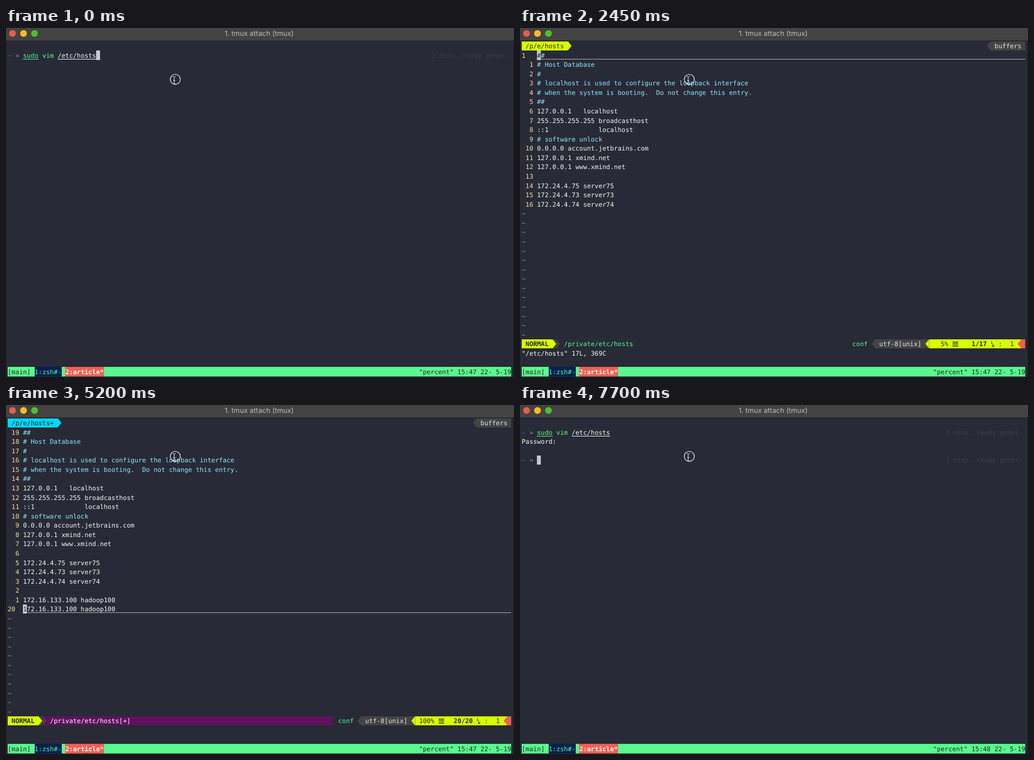
An HTML page that plays this animation: 902x621 px, repeating every 8 s.

```html
<!DOCTYPE html>
<html lang="en">
<head>
<meta charset="utf-8">
<title>Terminal</title>
<style>
  html, body { margin: 0; width: 100%; height: 100%; overflow: hidden; background: #282a36; }
  svg { display: block; }
  text {
    font: 11.345px "DejaVu Sans Mono", monospace;
    white-space: pre;
    text-rendering: geometricPrecision;
  }
  .bold { font-weight: bold; }
  .title { font: 12.4px Inter, "Open Sans", sans-serif; }
  .tiny { font-size: 6.5px; font-weight: bold; }
  rect { shape-rendering: crispEdges; }
</style>
</head>
<body>
<svg id="stage" width="902" height="621" viewBox="0 0 902 621"></svg>
<script>
const LOOP = 8000;
const CELL = 6.826, LINE = 16.57;
const C = {
  bg: '#282a36', fg: '#f8f8f2', green: '#5af78e', cyan: '#8be9fd', number: '#f1e0a0',
  cursor: '#c7c8cc', rule: '#b0b1b6', grey: '#444444', yellow: '#d7ff00', sky: '#00d7ff',
  blue: '#0057c2', navy: '#06204f', purple: '#5f115f', red: '#ee6055', dark: '#25281e',
  tilde: '#8790a8', faint: '#3b3d46'
};

const px = col => 3 + col * CELL;
const py = row => 23.5 + row * LINE;

// Drawing helpers, all placed on the character grid
const text = (row, col, str, fill = C.fg, cls = '') =>
  `<text x="${px(col)}" y="${py(row) + 12.5}" fill="${fill}" class="${cls}">${str}</text>`;

const block = (row, from, to, fill) =>
  `<rect x="${px(from)}" y="${py(row)}" width="${(to - from) * CELL}" height="${LINE}" fill="${fill}"/>`;

const rule = (row, from, to, fill) =>
  `<rect x="${px(from)}" y="${Math.round(py(row) + 14.5)}" width="${(to - from) * CELL}" height="1" fill="${fill}"/>`;

function arrow(row, col, fill, left) {
  const base = px(left ? col + 1 : col), tip = px(left ? col : col + 1), y = py(row);
  return `<path d="M${base} ${y}L${tip} ${y + LINE / 2}L${base} ${y + LINE}Z" fill="${fill}"/>`;
}

const cursor = (row, col, char = '') =>
  block(row, col, col + 1, C.cursor) + (char && text(row, col, char, C.bg));

function frameBar() {
  const lights = ['#e95b50', '#f2bd27', '#52bd2e']
    .map((fill, i) => `<circle cx="${11.6 + i * 19.5}" cy="9.8" r="6" fill="${fill}"/>`).join('');
  return '<rect width="902" height="621" fill="#282a36"/>' +
    '<rect x="901" y="22" width="1" height="599" fill="#1d1f28"/>' +
    '<rect width="902" height="21.5" fill="#434343"/>' + lights +
    '<text class="title" x="449.5" y="14.3" text-anchor="middle" fill="#bdbdbd">1. tmux attach (tmux)</text>';
}

const tmuxBar = clock =>
  block(35, 0, 131, C.green) + text(35, 0, '[main]', C.dark) +
  block(35, 7, 14, C.navy) + text(35, 7, '1:zsh#-', C.green) +
  block(35, 15, 25, C.red) + text(35, 15, '2:article*', C.fg, 'bold') +
  text(35, 107, `"percent" ${clock} 22- 5-19`, C.dark);

const prompt = row =>
  text(row, 0, '~', '#1671d0') + text(row, 2, '»', '#8c97b4') +
  text(row, 110.3, '2 mins. ready gener.', C.faint);

const command = () =>
  prompt(1) + text(1, 4, 'sudo', C.green) + rule(1, 4, 8, C.green) +
  text(1, 9, 'vim', C.green) + text(1, 13, '/etc/hosts') + rule(1, 13, 23, C.fg);

const password = () => command() + text(2, 0, 'Password:');

const HOSTS = [
  '##',
  '# Host Database',
  '#',
  '# localhost is used to configure the loopback interface',
  '# when the system is booting.  Do not change this entry.',
  '##',
  '127.0.0.1   localhost',
  '255.255.255.255 broadcasthost',
  '::1             localhost',
  '# software unlock',
  '0.0.0.0 account.jetbrains.com',
  '127.0.0.1 xmind.net',
  '127.0.0.1 www.xmind.net',
  '',
  '172.24.4.75 server75',
  '172.24.4.73 server73',
  '172.24.4.74 server74'
];

function tabLine(changed) {
  const fill = changed ? C.sky : C.yellow, end = changed ? 13 : 12;
  return block(0, 0, end, fill) + arrow(0, end, fill) +
    text(0, 1, changed ? '/p/e/hosts+' : '/p/e/hosts', C.dark) +
    arrow(0, 121, C.grey, true) + block(0, 122, 131, C.grey) + text(0, 123, 'buffers', '#e4e4e4');
}

function statusLine({ insert, changed, percent, at, col }) {
  const r = 32;
  const main = insert ? C.sky : C.yellow, side = insert ? C.blue : C.grey;
  const ink = insert ? C.navy : C.dark, middle = insert ? C.navy : C.bg;
  const y = py(r);
  return (changed ? block(r, 9, 85, C.purple) + arrow(r, 84, middle, true) : '') +
    block(r, 85, 92, middle) +
    block(r, 8, 9, side) + arrow(r, 9, side) +
    block(r, 0, 8, main) + arrow(r, 8, main) +
    text(r, 1, insert ? 'INSERT' : 'NORMAL', ink, 'bold') +
    text(r, 11, '/private/etc/hosts' + (changed ? '[+]' : ''), changed ? C.fg : C.green) +
    text(r, 86, 'conf', insert ? C.fg : C.green) +
    arrow(r, 91, side, true) + block(r, 92, 106, side) + text(r, 93, 'utf-8[unix]', '#e4e4e4') +
    arrow(r, 105, main, true) + block(r, 106, 130, main) +
    text(r, 107, percent.padStart(4), ink) +
    `<path d="M768 ${y + 5.2}h10m-10 3.4h10m-10 3.4h10" stroke="${ink}" stroke-width="1.5"/>` +
    text(r, 116, at.padStart(5), ink, 'bold') +
    `<text class="tiny" x="836" y="${y + 8}" fill="${ink}">L</text>` +
    `<text class="tiny" x="838" y="${y + 14.5}" fill="${ink}">N</text>` +
    text(r, 124, ':' + String(col).padStart(3), ink) +
    arrow(r, 129, C.red, true) + block(r, 130, 131, C.red);
}

// line: current line number; col: current column; hidden: cursor is in the command line
function editor({ extra = [], line, col, insert, hidden, percent = '100%', message = '' }) {
  const lines = [...HOSTS, ...extra], changed = extra.length > 0;
  let out = tabLine(changed);
  lines.forEach((str, i) => {
    const n = i + 1, current = n === line;
    const label = current ? String(n) : String(Math.abs(n - line)).padStart(3);
    out += text(n, 0, label, C.number) + text(n, 4, str, str[0] === '#' ? C.cyan : C.fg);
  });
  out += rule(line, 4, 131, C.rule);
  if (!hidden) out += cursor(line, 3 + col, lines[line - 1][col - 1]);
  for (let row = lines.length + 1; row < 32; row++) out += text(row, 0, '~', C.tilde);
  const at = `${line}/${lines.length}`;
  return out + statusLine({ insert, changed, percent, at, col }) + text(33, 0, message) +
    (insert ? text(34, 0, '-- INSERT --', C.fg, 'bold') : '');
}

const host = (ip, name) => `172.16.133.${ip} hadoop${name}`;
const pair = (ip, name) => ['', host(100, 100), host(ip, name)];
const written = '"/etc/hosts" 17L, 369C';

// [start in ms, picture, clock]
const scenes = [
  [0, command() + cursor(1, 23), '15:47'],
  [500, password() + cursor(2, 9), '15:47'],
  [2150, password() + cursor(3, 0), '15:47'],
  [2450, editor({ line: 1, col: 1, percent: '5%', message: written }), '15:47'],
  [3450, editor({ extra: ['', '172'], line: 19, col: 4, insert: true, message: written }), '15:47'],
  [4200, editor({ extra: ['', host(100, 100)], line: 19, col: 24 }), '15:47'],
  [5200, editor({ extra: pair(100, 100), line: 20, col: 1 }), '15:47'],
  [6200, editor({ extra: pair(101, 100), line: 20, col: 14 }), '15:47'],
  [6700, editor({ extra: pair(101, 101), line: 20, col: 24, hidden: true, message: ':' }) + cursor(33, 1), '15:48'],
  [7700, password() + prompt(4) + cursor(4, 4), '15:48']
];

const pointer =
  '<circle cx="300.6" cy="91.4" r="8.9" fill="none" stroke="#f4f8fc" stroke-width="1.2"/>' +
  '<path d="M296 86.2q2.6 0 2.6 2.2v9.4q0 2.2-2.6 2.2M301.2 86.2q-2.6 0-2.6 2.2M301.2 100q-2.6 0-2.6-2.2M296.8 93.6h3.8" ' +
  'fill="none" stroke="#d3e4f3" stroke-width="1"/>';

const stage = document.getElementById('stage');
stage.innerHTML = frameBar() +
  scenes.map(([, art, clock]) => `<g class="scene" visibility="hidden">${art}${tmuxBar(clock)}</g>`).join('') +
  pointer;

const groups = [...stage.querySelectorAll('.scene')];
let shown = -1;

function tick() {
  const t = performance.now() % LOOP;
  const now = scenes.findLastIndex(([start]) => start <= t);
  if (now !== shown) {
    groups.forEach((g, i) => g.setAttribute('visibility', i === now ? 'visible' : 'hidden'));
    shown = now;
  }
  requestAnimationFrame(tick);
}
tick();
</script>
</body>
</html>
```
